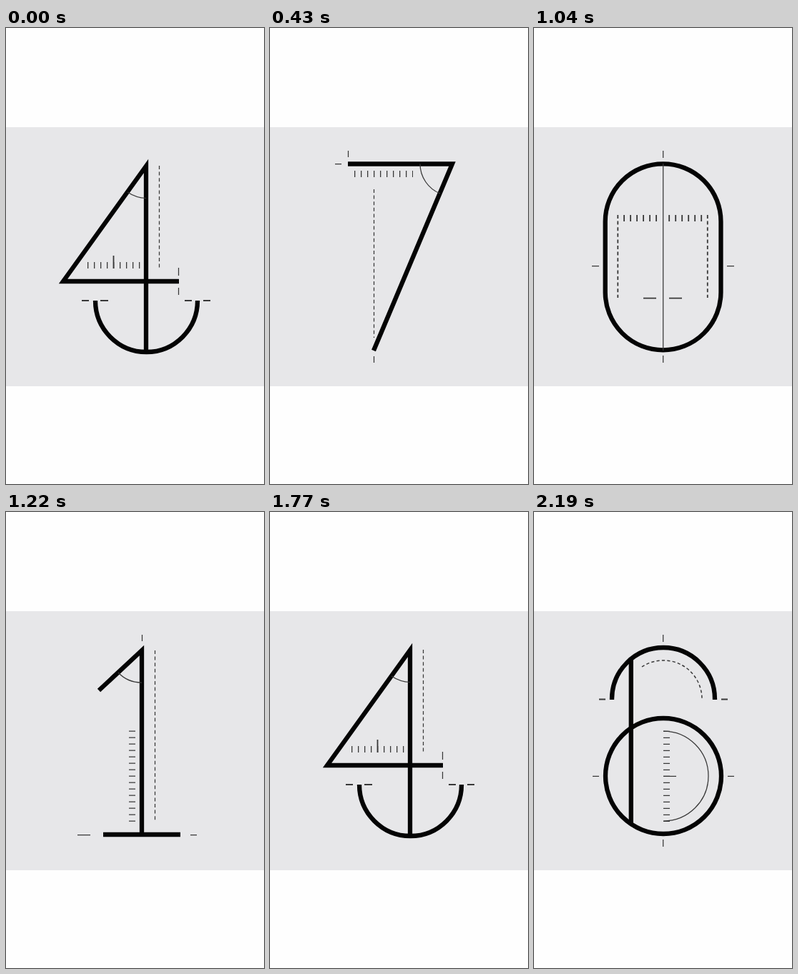
Recreate the animation shown at these times as an HTML page. Size 361 by 639 pixels, loop 2.25 s.

```html
<!DOCTYPE html>
<html lang="en">
<head>
<meta charset="utf-8">
<title>Drafted numerals</title>
<style>
  html, body { margin: 0; width: 100%; height: 100%; overflow: hidden; background: #fefefe; }
  .stage { position: relative; width: 361px; height: 639px; overflow: hidden; }
  .panel { position: absolute; top: 139px; width: 361px; height: 363px; background: #e7e7e9; }
  .strip { position: absolute; top: 0; left: 0; width: 3610px; height: 639px;
    filter: blur(.5px); animation: count 2250ms step-end infinite; }
  path, circle { fill: none; stroke: #383838; stroke-width: 1.25; }
  .bold { stroke: #040404; stroke-width: 6.3; }
  .mid { stroke-width: 1.8; }
  .soft { stroke: #6c6c6c; }
  .dash { stroke-dasharray: 5 3.6; }
  .arc { stroke-width: 1.5; stroke-dasharray: 4.2 3.2; }
  .rule { stroke-width: 9; stroke-dasharray: 1.3 7.7; }
  .heavy { stroke-dasharray: 1.8 7.2; }

  /* The strip holds 0-9 side by side; each key picks one digit. */
  @keyframes count {
    0%      { transform: translateX(-1444px); }
    2.666%  { transform: translateX(-1805px); }
    13.777% { transform: translateX(-2166px); }
    19.111% { transform: translateX(-2527px); }
    32.888% { transform: translateX(-2888px); }
    38.222% { transform: translateX(-3249px); }
    46.222% { transform: translateX(0); }
    54.222% { transform: translateX(-361px); }
    65.333% { transform: translateX(-722px); }
    73.333% { transform: translateX(-1083px); }
    78.666% { transform: translateX(-1444px); }
    89.333% { transform: translateX(-1805px); }
    97.333%, 100% { transform: translateX(-2166px); }
  }
</style>
</head>
<body>
<div class="stage">
  <div class="panel"></div>
  <svg class="strip" viewBox="0 0 3610 639">
    <defs>
      <path id="ends" d="M180.7 172v10M180.7 459v10"/>
      <path id="sides" d="M82 .4h9M271 .4h9"/>
      <g id="six">
        <circle class="bold" cx="181" cy="370" r="81"/>
        <path class="bold" d="M109 263v-1a72 72 0 0 1 144 0v1M135.8 206V437"/>
        <use href="#ends"/>
        <use href="#sides" y="370"/>
        <path class="mid" d="M91 262.5h9M262 262.5h9"/>
        <path class="arc" d="M151 217A54 54 0 0 1 235 262"/>
        <path d="M181 307a63 63 0 0 1 0 126M181 370.4h18"/>
        <path class="rule" d="M185.5 306.7V434"/>
      </g>
    </defs>

    <g>
      <rect x="99.7" y="190.3" width="161.8" height="261" rx="80.9" fill="none" class="bold"/>
      <use href="#ends"/>
      <path d="M180.7 190V452M81 333.5h10M270 333.5h10"/>
      <path class="mid dash" d="M117.3 262V378M242.8 262V378"/>
      <path class="rule heavy" d="M125.2 266.5H173M188.3 266.5H236"/>
      <path class="mid" d="M153 378.7h18M189 378.7h18"/>
    </g>

    <g transform="translate(361)">
      <path class="bold" d="M130 250L190 194V452M136 452H244"/>
      <path d="M190.5 172v9M100 452.5h18M258 452.5h9"/>
      <path class="dash" d="M208.5 194V434"/>
      <path class="rule" d="M176.5 306.5V434"/>
      <path d="M190 239A45 45 0 0 1 157 225"/>
    </g>

    <g transform="translate(722)">
      <path class="bold" d="M130 190.5H167a81 81 0 0 1 0 162H130M247 264L103 451H247.5"/>
      <path d="M130.5 172v10M130.5 361v10M256 271.5h10M139 199.5h9M139 271.5h9M139 343.5h9"/>
      <path class="rule" d="M134.5 199V344"/>
      <path d="M148 449A45 45 0 0 0 130 416"/>
      <path class="soft" d="M185 398h25M230 398h25M220.5 363v24M220.5 407v25"/>
    </g>

    <g transform="translate(1083)">
      <path class="bold" d="M118 190.5H172a81 81 0 0 1 0 162M181 289a81 81 0 1 1-81 81"/>
      <use href="#ends"/>
      <path d="M82 370.5h9M271 370.5h9M262 271.5h9"/>
      <path d="M181 307a63 63 0 0 1 0 126"/>
      <path class="rule" d="M185.5 306.5V434"/>
      <path class="arc" d="M172 208a63 63 0 0 1 63 63"/>
    </g>

    <g transform="translate(1444)">
      <path class="bold" d="M196 454V193.5L80 355H242M125 382a71.5 72 0 0 0 143 0"/>
      <path d="M170 230Q182 238 196 238.5"/>
      <path class="dash" d="M214.5 193V339"/>
      <path class="rule" d="M114 332.5H188"/>
      <path d="M150.5 319V337" class="mid"/>
      <path d="M241.5 336v11M241.5 364v10"/>
      <path class="mid" d="M106 382h10M132 382h11M250 382h10M276 382h10"/>
    </g>

    <g transform="translate(1805)">
      <path class="bold" d="M244 190.5H118V322A81 81 0 1 1 100 373"/>
      <path d="M118.5 172v9M253 190.5h9M180.5 463v9M82 373.5h9M271 373.5h9"/>
      <path d="M181 310a63 63 0 0 1 0 126M181 373.5h18"/>
      <path class="rule" d="M185.5 309.5V437"/>
      <path class="dash" d="M136.5 208V290"/>
    </g>

    <use href="#six" x="2166"/>

    <g transform="translate(2527)">
      <path class="bold" d="M109 190.5H255L145 452"/>
      <path d="M109.5 172v9M91 190.5h9M145.5 460v9M210 190.5A45 45 0 0 0 238 232"/>
      <path class="rule" d="M118 204.5H200"/>
      <path class="dash" d="M145.5 226V434"/>
    </g>

    <g transform="translate(2888)">
      <circle class="bold" cx="181" cy="271" r="81"/>
      <circle class="bold" cx="181" cy="370" r="81"/>
      <use href="#ends"/>
      <use href="#sides" y="270.5"/>
      <use href="#sides" y="370"/>
      <path d="M180.7 190V452M181 208a63 63 0 0 1 0 126M181 307a63 63 0 0 0 0 126"/>
      <path class="dash" d="M100 271H181M181 370.3H262"/>
    </g>

    <use href="#six" transform="translate(3249) rotate(180 181 320.5)"/>
  </svg>
</div>
</body>
</html>
```
